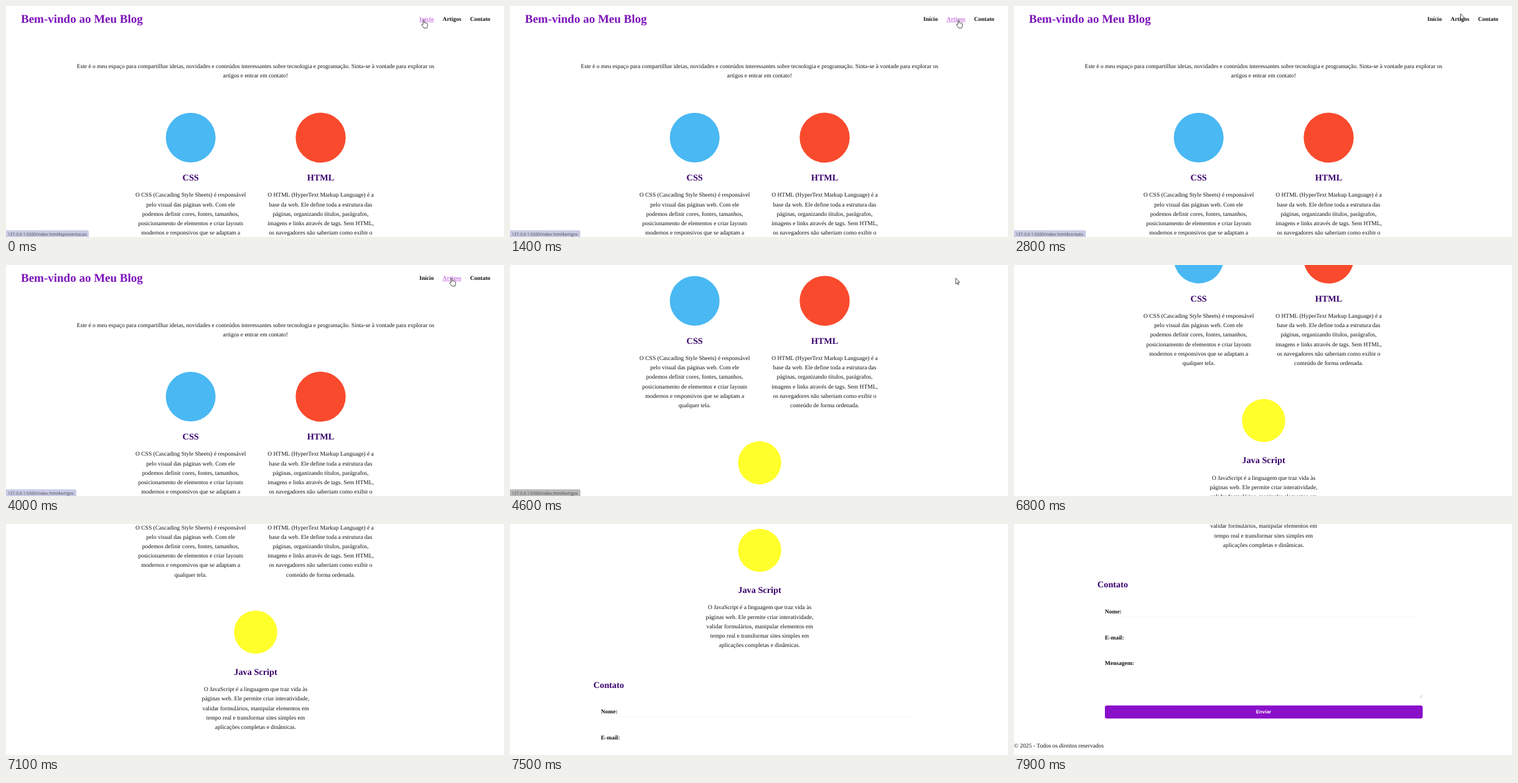
Recreate the animation shown at these times as an HTML page. Size 800 px wide and 372 px high, loop 8000 ms.

```html
<!DOCTYPE html>
<html lang="pt-BR">
<head>
<meta charset="utf-8">
<title>Blog</title>
<style>
  html, body { margin: 0; width: 100%; height: 100%; overflow: hidden; background: #fff; }
  svg { display: block; width: 100vw; height: 100vh; }
  text { font: 9.5px "Liberation Serif", "Times New Roman", serif; fill: #111; text-rendering: geometricPrecision; }
  .mid { text-anchor: middle; }
  .bold { font-weight: bold; }
  .title { font-size: 19px; font-weight: bold; fill: #7d12bb; }
  .head { font-size: 14.25px; font-weight: bold; fill: #38006b; }
  .hover { fill: #cb78e2; text-decoration: underline; }
  .button { font: bold 8px "Liberation Sans", Arial, sans-serif; fill: #fff; }
  .status { font: 6.65px "Open Sans", "Noto Sans", sans-serif; fill: #444; }
</style>
</head>
<body>
<svg id="stage" viewBox="0 0 800 372"></svg>
<script>
const LOOP = 8000, STEP = 100, LINE = 15.2;
const CLICK = 4500, ARTICLES_Y = 154.3, DRAG = 6300;

function make(parent, tag, attrs, content = "") {
  const el = document.createElementNS("http://www.w3.org/2000/svg", tag);
  for (const key in attrs) el.setAttribute(key, attrs[key]);
  el.textContent = content;
  return parent.appendChild(el);
}

const stage = document.getElementById("stage");
const page = make(stage, "g", {});
const text = (x, y, content, cls = "") => make(page, "text", { x, y, class: cls }, content);
const paragraph = (x, y, lines) => lines.forEach((line, i) => text(x, y + i * LINE, line, "mid"));

function article(x, y, r, color, name, headY, lines) {
  make(page, "circle", { cx: x, cy: y, r, fill: color });
  text(x, headY, name, "head mid");
  paragraph(x, headY + 26.3, lines);
}

text(24, 27, "Bem-vindo ao Meu Blog", "title");
const links = [
  { x: 664, w: 23.2, label: "Início", hash: "apresentacao", bar: 133 },
  { x: 701.3, w: 30, label: "Artigos", hash: "artigos", bar: 113 },
  { x: 745.4, w: 32.7, label: "Contato", hash: "contato", bar: 115.5 }
];
for (const link of links) link.el = text(link.x, 24, link.label);

paragraph(400.8, 99.6, [
  "Este é o meu espaço para compartilhar ideias, novidades e conteúdos interessantes sobre tecnologia e programação. Sinta-se à vontade para explorar os",
  "artigos e entrar em contato!"
]);

article(296.7, 212, 40, "#49b8f3", "CSS", 281, [
  "O CSS (Cascading Style Sheets) é responsável",
  "pelo visual das páginas web. Com ele",
  "podemos definir cores, fontes, tamanhos,",
  "posicionamento de elementos e criar layouts",
  "modernos e responsivos que se adaptam a",
  "qualquer tela."
]);
article(505.5, 212, 40.2, "#f94a2d", "HTML", 281, [
  "O HTML (HyperText Markup Language) é a",
  "base da web. Ele define toda a estrutura das",
  "páginas, organizando títulos, parágrafos,",
  "imagens e links através de tags. Sem HTML,",
  "os navegadores não saberiam como exibir o",
  "conteúdo de forma ordenada."
]);
article(401, 472.8, 34.7, "#ffff2c", "Java Script", 541.6, [
  "O JavaScript é a linguagem que traz vida às",
  "páginas web. Ele permite criar interatividade,",
  "validar formulários, manipular elementos em",
  "tempo real e transformar sites simples em",
  "aplicações completas e dinâmicas."
]);

text(134, 694, "Contato", "head");
["Nome:", "E-mail:", "Mensagem:"].forEach((label, i) => text(146, 735.8 + i * 41.7, label, "bold"));
make(page, "path", { d: "M172 741.3H650", stroke: "#f4f4f4", "stroke-width": 0.7 });
make(page, "path", { d: "M651 871.8l4.6-4.6M653.6 871.8l2-2", stroke: "#999", "stroke-width": 0.6 });
make(page, "rect", { x: 146, y: 884.2, width: 510.5, height: 21, rx: 3, fill: "#8a0fc9" });
text(401, 897.4, "Enviar", "button mid");
text(0, 951.8, "© 2025 - Todos os direitos reservados");

const status = make(stage, "g", {});
const statusBar = make(status, "path", {});
const statusText = make(status, "text", { x: 3, y: 369.8, class: "status" });

const cursorStyle = { fill: "#fff", stroke: "#222", "stroke-width": 0.8, "stroke-linejoin": "round" };
const arrow = make(stage, "path", { ...cursorStyle, d: "M0 0V9.6L2.2 7.6 3.6 10.8 5 10.2 3.6 7H6.5Z" });
const hand = make(stage, "path", {
  ...cursorStyle,
  d: "M-.9 7.2V1Q-.9 0 0 0T.9 1V4.6Q2.6 4 2.8 5Q4.4 4.5 4.6 5.6Q6.2 5.2 6.2 6.6V9.6L5.2 13H.2L-3 8.4Q-3.6 7 -2.4 6.8Z"
});

// Pointer path: time, x, y
const path = [
  [0, 671, 22.5], [300, 683, 22], [500, 715, 22], [700, 754, 22], [900, 760, 22],
  [1000, 716, 22], [1300, 716, 22], [1400, 720.5, 22.5], [1900, 720.5, 22.5],
  [2000, 738, 22], [2100, 756, 21.5], [2300, 757, 21.5], [2400, 756, 22], [2500, 756, 22],
  [2700, 738, 16], [2800, 717.5, 12.5], [3000, 717, 14], [3200, 717, 19], [3600, 716, 19.5],
  [3700, 716, 21], [4700, 716, 21], [5300, 736, 40], [5600, 736, 40], [5800, 779, 71],
  [5900, 779, 71], [6000, 777, 77], [6100, 777, 77], [6200, 830, 77], [LOOP, 830, 77]
];

function pointerAt(t) {
  const i = path.findIndex(key => key[0] > t);
  const [t0, x0, y0] = path[i - 1], [t1, x1, y1] = path[i];
  const k = (t - t0) / (t1 - t0);
  return { x: x0 + (x1 - x0) * k, y: y0 + (y1 - y0) * k };
}

function scrollAt(t) {
  if (t < CLICK) return 0;
  return ARTICLES_Y + 437.6 * Math.pow(Math.max(0, t - DRAG) / 1600, 1.6);
}

function hoverAt(t) {
  if (t >= CLICK) return null;
  const { x, y } = pointerAt(t);
  return links.find(l => x >= l.x && x <= l.x + l.w && y > 15 && y < 28) || null;
}

function lastHover(t) {
  for (; t > 0; t -= STEP) {
    const link = hoverAt(t);
    if (link) return link;
  }
  return links[0];
}

function draw(t) {
  const hovered = hoverAt(t), shown = lastHover(t), { x, y } = pointerAt(t);
  page.setAttribute("transform", `translate(0 ${-scrollAt(t)})`);
  for (const link of links) link.el.setAttribute("class", link === hovered ? "bold hover" : "bold");

  statusBar.setAttribute("d", `M0 361.3H${shown.bar - 2}q2 0 2 2V372H0Z`);
  statusBar.setAttribute("fill", t < CLICK ? "#c9cbe6" : "#b9b9b9");
  statusText.textContent = "127.0.0.1:5500/index.html#" + shown.hash;
  status.setAttribute("opacity", Math.min(1, Math.max(0, (5000 - t) / 300)));

  arrow.setAttribute("visibility", hovered ? "hidden" : "visible");
  hand.setAttribute("visibility", hovered ? "visible" : "hidden");
  for (const shape of [arrow, hand]) shape.setAttribute("transform", `translate(${x} ${y})`);
}

const start = performance.now();
function tick() {
  const t = (performance.now() - start) % LOOP;
  draw(Math.floor(t / STEP) * STEP);
  requestAnimationFrame(tick);
}
tick();
</script>
</body>
</html>
```
